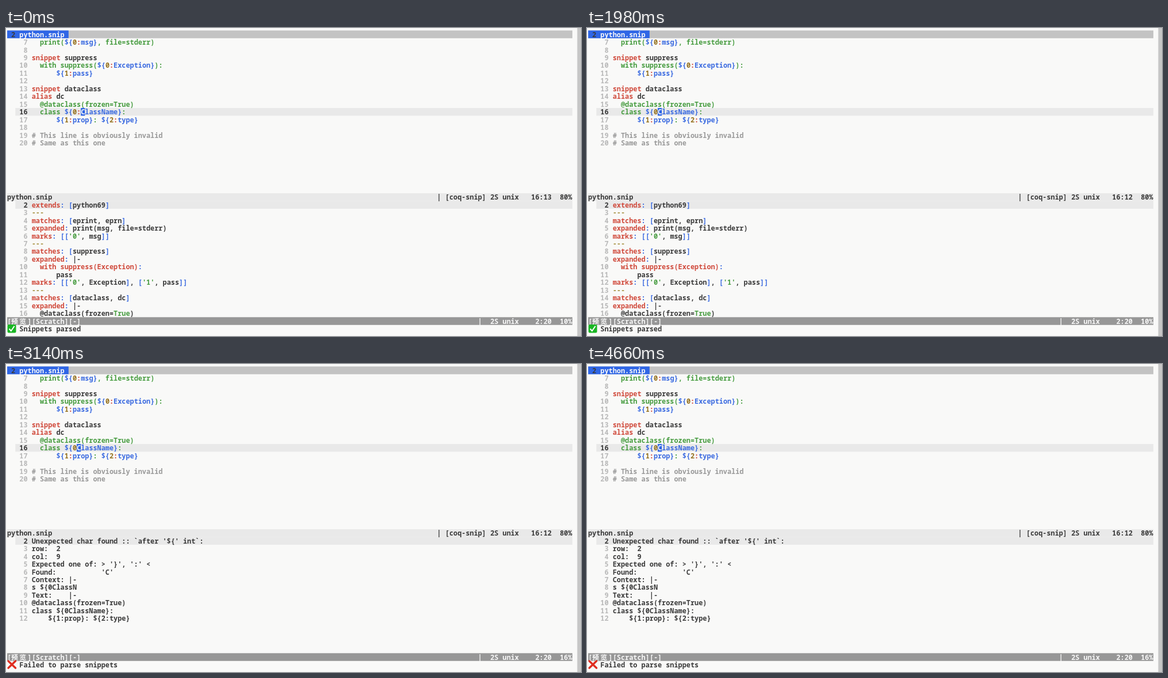
Animation of 1000x535 px, one loop 4680 ms. Source, as an HTML page:

```html
<!DOCTYPE html>
<html lang="en">
<head>
<meta charset="utf-8">
<title>Snippet editor</title>
<style>
html, body { margin: 0; width: 100%; height: 100%; overflow: hidden; background: #f9f9f8; }
svg { display: block; width: 100vw; height: 100vh; }
text {
  font: 600 11.867px "Noto Sans Mono", "DejaVu Sans Mono", "Noto Sans CJK SC", "Noto Sans CJK", monospace;
  font-variant-ligatures: none;
  white-space: pre;
}
</style>
</head>
<body>
<svg id="stage" viewBox="0 0 1000 535"></svg>
<script>
const LOOP = 4680, DELETE_AT = 1340, ERROR_AT = 2380;
const CELL = 7.12, ROW = 13.46, LEFT = 2, TOP = 4.3, RIGHT = 985;
const CURSOR_ROW = 10, STATUS_ROW = 21, PREVIEW_ROW = 22, PREVIEW_STATUS = 37, MESSAGE_ROW = 38;
const PAPER = "#f9f9f8", SHADE = "#e9e9e9", ACCENT = "#2f66e6";

const INK = {
  d: "#3a3a3a", r: "#d04a3c", g: "#479c40", b: "#3a6ae0", y: "#94701c",
  c: "#999999", n: "#b9b9b9", l: "#f8f8f8", o: "#a08a35"
};

const stage = document.getElementById("stage");
const colX = col => LEFT + col * CELL;
const rowY = row => TOP + row * ROW;

function add(parent, tag, attrs) {
  const node = document.createElementNS("http://www.w3.org/2000/svg", tag);
  for (const key in attrs) node.setAttribute(key, attrs[key]);
  parent.append(node);
  return node;
}

const group = () => add(stage, "g", {});

function box(parent, x, row, right, fill) {
  return add(parent, "rect", { x, y: rowY(row), width: right - x, height: ROW, fill });
}

function put(parent, col, row, str, ink) {
  const node = add(parent, "text", { x: colX(col), y: rowY(row) + 11.3, fill: INK[ink] });
  node.textContent = str;
  return node;
}

// "^r" inside a line switches the ink; each run starts on its own cell.
function line(parent, col, row, src) {
  const parts = src.split(/\^([a-z])/);
  let ink = "d";
  parts.forEach((part, i) => {
    if (i % 2) { ink = part; return; }
    const indent = part.length - part.trimStart().length;
    if (part.trim()) put(parent, col + indent, row, part.trim(), ink);
    col += part.length;
  });
}

function lines(parent, firstRow, firstNumber, list, current) {
  list.forEach((src, i) => {
    const number = firstNumber + i;
    put(parent, number < 10 ? 4 : 3, firstRow + i, String(number), number === current ? "d" : "n");
    line(parent, 6, firstRow + i, src);
  });
}

const mark = (n, name) => "^b${^y" + n + "^r:^b" + name + "}^g";
const key = (name, rest) => "^r" + name + "^b:^d " + rest;
const list = inner => "^b[^d" + inner + "^b]^d";
const pair = (n, name) => list("^g'" + n + "'^d, " + name);

const code = [
  "^g  print(" + mark(0, "msg") + ", file=stderr)",
  "",
  "^rsnippet^d suppress",
  "^g  with suppress(" + mark(0, "Exception") + "):",
  "      " + mark(1, "pass"),
  "",
  "^rsnippet^d dataclass",
  "^ralias^d dc",
  "^g  @dataclass(frozen=True)",
  "",
  "      " + mark(1, "prop") + ": " + mark(2, "type"),
  "",
  "^c# This line is obviously invalid",
  "^c# Same as this one"
];

const parsed = [
  key("extends", list("python69")),
  "^o---",
  key("matches", list("eprint, eprn")),
  key("expanded", "print(msg, file=stderr)"),
  key("marks", list(pair(0, "msg"))),
  "^o---",
  key("matches", list("suppress")),
  key("expanded", "|-"),
  "^r  with suppress(Exception)^b:",
  "      pass",
  key("marks", list(pair(0, "Exception") + ", " + pair(1, "pass"))),
  "^o---",
  key("matches", list("dataclass, dc")),
  key("expanded", "|-"),
  "  @dataclass(frozen=^gTrue^d)"
];

const failure = [
  "Unexpected char found :: `after '${' int`:",
  "row:  2",
  "col:  9",
  "Expected one of: > '}', ':' <",
  "Found:           'C'",
  "Context: |-",
  "s ${0ClassN",
  "Text:    |-",
  "@dataclass(frozen=True)",
  "class ${0ClassName}:",
  "    ${1:prop}: ${2:type}"
];

function drawFrame() {
  const g = group();
  add(g, "rect", { width: 1000, height: 535, fill: PAPER });
  add(g, "rect", { x: 993.5, width: 6.5, height: 535, fill: "#c6c6c6" });
  box(g, LEFT, 0, RIGHT, "#c3c3c3");
  box(g, LEFT, 0, colX(15), ACCENT);
  put(g, 1, 0, "2", "d");
  put(g, 3, 0, "python.snip", "l");

  box(g, colX(2), CURSOR_ROW, RIGHT, SHADE);
  lines(g, 1, 7, code, 16);

  box(g, LEFT, STATUS_ROW, RIGHT, SHADE);
  box(g, colX(2), PREVIEW_ROW, RIGHT, SHADE);
  put(g, 0, STATUS_ROW, "python.snip", "d");
  [[105, "|"], [107, "[coq-snip]"], [118, "2S"], [121, "unix"], [135, "80%"]]
    .forEach(([col, str]) => put(g, col, STATUS_ROW, str, "d"));

  box(g, LEFT, PREVIEW_STATUS, RIGHT, "#979797");
  [[0, "["], [1, "预"], [3, "览"], [5, "]"], [6, "[Scratch]"], [15, "[-]"],
   [115, "|"], [118, "2S"], [121, "unix"], [129, "2:20"]]
    .forEach(([col, str]) => put(g, col, PREVIEW_STATUS, str, "l"));
}

function drawEdit(colon) {
  const g = group();
  const col = colon ? 18 : 17;
  line(g, 6, CURSOR_ROW, "^g  class ^b${^y0" + (colon ? "^r:" : "") + "^b ^blassName}^g:");
  box(g, colX(col), CURSOR_ROW, colX(col + 1), ACCENT);
  put(g, col, CURSOR_ROW, "C", "l");
  put(g, 128, STATUS_ROW, "16:" + (col - 5), "d");
  return g;
}

function drawPreview(ok) {
  const g = group();
  lines(g, PREVIEW_ROW, 2, ok ? parsed : failure, 2);
  put(g, 135, PREVIEW_STATUS, ok ? "10%" : "16%", "l");
  put(g, 3, MESSAGE_ROW, ok ? "Snippets parsed" : "Failed to parse snippets", "d");
  if (ok) {
    add(g, "rect", { x: 2.5, y: 515, width: 15, height: 14.5, rx: 2.5, fill: "#1ab624" });
    add(g, "path", { d: "M5.5 522.5 L8.8 526.2 L14.6 517.8", fill: "none", stroke: "#fff", "stroke-width": 2 });
  } else {
    add(g, "path", { d: "M4 516 L16.5 528 M16.5 516 L4 528", stroke: "#df2d20", "stroke-width": 3.4, "stroke-linecap": "round" });
  }
  return g;
}

drawFrame();
const before = drawEdit(true), after = drawEdit(false);
const success = drawPreview(true), error = drawPreview(false);
const show = (node, on) => node.setAttribute("display", on ? "inline" : "none");

function render(t) {
  show(before, t < DELETE_AT);
  show(after, t >= DELETE_AT);
  show(success, t < ERROR_AT);
  show(error, t >= ERROR_AT);
}

const start = performance.now();
function tick() {
  render((performance.now() - start) % LOOP);
  requestAnimationFrame(tick);
}
tick();
</script>
</body>
</html>
```
